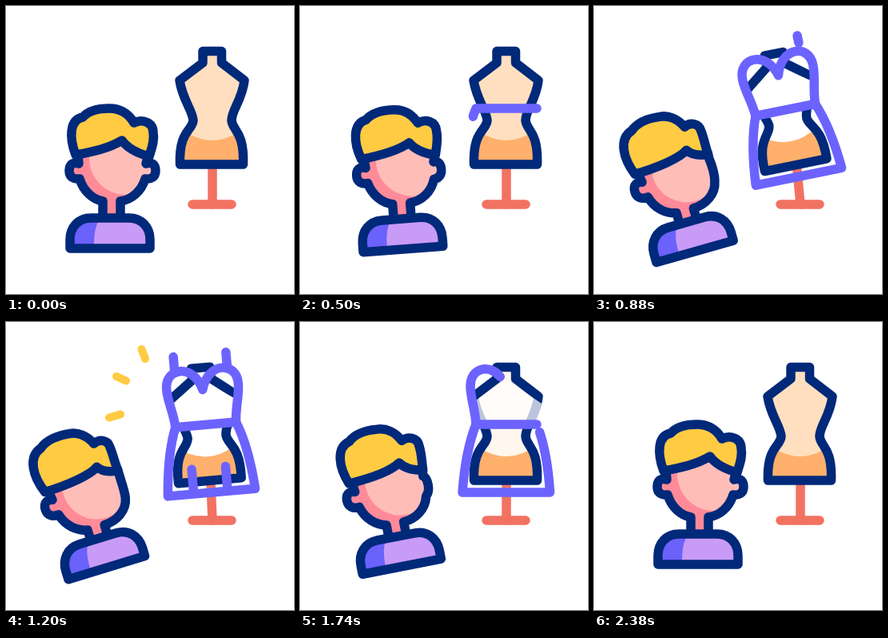
An HTML page for the animation above (2400 ms loop, 360 by 360 pixels).

```html
<!DOCTYPE html>
<html lang="en">
<head>
<meta charset="utf-8">
<title>Tailor</title>
<style>
  html, body { margin: 0; width: 100%; height: 100%; overflow: hidden; background: #fff; }
  svg { display: block; width: 100%; height: 100%; }
  .ink, .thread, .spark, .pole { fill: none; stroke-width: 11.5; stroke-linecap: round; stroke-linejoin: round; }
  .ink { stroke: #00297a; }
  .thread { stroke: #6c63ff; }
  .spark { stroke: #ffcb43; stroke-width: 10; }
  .pole { stroke: #f27262; }
</style>
</head>
<body>
<svg viewBox="0 0 360 360">
  <defs>
    <path id="form" d="M246 56.500H269.500V71L298 93C295 118 282 130 282 143C283 156 298 156 296.500 198H217.500C216 156 233 156 234 143C233 130 221 118 217 93L246 71Z"/>
    <path id="body" d="M80 303V292C80 277 90 265 106 265H154C170 265 180 277 180 292V303Z"/>
    <path id="face"/>
    <clipPath id="inForm"><use href="#form"/></clipPath>
    <clipPath id="inBody"><use href="#body"/></clipPath>
    <clipPath id="inFace"><use href="#face"/></clipPath>
  </defs>

  <path class="pole" d="M233 248H282"/>
  <path class="pole" id="pole"/>

  <g id="stand">
    <use href="#form" id="skin"/>
    <path clip-path="url(#inForm)" fill="#ffb06c" d="M215 150Q258 186 301 150V198H215Z"/>
    <use href="#form" class="ink"/>
    <path id="cover" fill="#fff" d="M214 102L258 72L302 102L296 128H220Z"/>
    <g id="dress"></g>
  </g>

  <g id="person">
    <use href="#face" fill="#ff8a98"/>
    <circle id="glow" clip-path="url(#inFace)" fill="#ffbdb8"/>
    <use href="#face" class="ink"/>
    <path id="hair" class="ink" style="fill:#ffcb43"/>
    <use href="#body" fill="#c89bf6"/>
    <path clip-path="url(#inBody)" fill="#6b61fb" d="M75 260H122C111 272 110 284 110 303H75Z"/>
    <use href="#body" class="ink"/>
  </g>

  <g id="sparks"></g>
</svg>
<script>
const LOOP = 2400;
const $ = id => document.getElementById(id);

const mix = (a, b, k) => a + (b - a) * k;
const smooth = (t, a, b) => {
  const u = Math.min(1, Math.max(0, (t - a) / (b - a)));
  return u * u * (3 - 2 * u);
};
const pulse = (t, [a, b, c, d]) => smooth(t, a, b) - smooth(t, c, d);

// Blend two path strings that share the same commands.
const morph = ([from, to], k) => {
  const goal = to.match(/\d+/g);
  let i = 0;
  return from.replace(/\d+/g, n => mix(+n, +goal[i++], k).toFixed(2));
};

// Front view and turned view.
const FACE = [
  'M90 186L91 197C82 194 79 200 79 206C79 214 85 217 92 216C97 232 109 242 121 244L121 268L143 268L143 244C157 242 169 232 174 216C181 217 187 214 187 206C187 200 184 194 175 197L178 186L145 168Z',
  'M88 190L90 202C81 199 78 205 78 211C78 219 84 223 92 222C96 238 108 248 121 251L121 268L143 268L143 251C159 251 175 242 178 226C179 221 179 216 179 211C179 205 179 201 179 197L179 189L155 179Z'
];
const HAIR = [
  'M87 186C79 165 79 142 96 139C104 130 116 128 129 128C142 128 153 134 160 146C170 141 184 145 184 158C186 168 182 178 179 188C164 184 152 178 145 168C128 178 110 182 87 186Z',
  'M84 190C75 167 76 142 95 136C105 128 121 127 134 129C145 130 155 138 160 150C168 146 178 150 178 160C179 170 178 180 179 191C170 190 160 187 155 179C145 186 115 190 84 190Z'
];

// Each line: path, then draw start, draw end, erase start, erase end.
const DRESS = [
  ['M296 128H220Q207 160 203 213H312.500Q309 160 296 128', 360, 800, 1700, 2100],
  ['M220 128C219 108 213 96 213 80C213 52 249 50 258 84C267 50 303 52 303 80C303 96 297 108 296 128', 560, 860, 1620, 1840],
  ['M291 40V60', 820, 950, 1560, 1680],
  ['M225 40V60', 910, 1040, 1540, 1660],
  ['M235.500 212V182', 1060, 1180, 1280, 1420],
  ['M278 212V182', 1060, 1180, 1280, 1420]
];
const SPARKS = ['M174 46L169.500 34', 'M150 73.500L138 68', 'M143 115.500L129 119.500'];

const addLine = (parent, cls, d) => {
  const path = document.createElementNS('http://www.w3.org/2000/svg', 'path');
  path.setAttribute('class', cls);
  path.setAttribute('d', d);
  parent.append(path);
  return { path, length: path.getTotalLength() };
};
const threads = DRESS.map(([d, ...times]) => ({ ...addLine($('dress'), 'thread', d), times }));
const sparks = SPARKS.map(d => addLine($('sparks'), 'spark', d));

const trim = ({ path, length }, from, to) => {
  path.style.visibility = to - from > 0.005 ? 'visible' : 'hidden';
  path.style.strokeDasharray = `0 ${from * length} ${(to - from) * length} ${length * 2}`;
};

const TILT = [[620, 0], [880, -11.5], [1080, -11.5], [1400, 8.6], [1720, 0]];
const tiltAt = t => TILT.slice(1).reduce(
  (angle, [time, value], i) => angle + (value - TILT[i][1]) * smooth(t, TILT[i][0], time), 0);

function draw(t) {
  const near = Math.min(t, LOOP - t);
  const lean = 0.9 * smooth(near, 320, 840) + 0.1 * smooth(near, 700, 1200);
  $('person').setAttribute('transform', `translate(${-3 * lean} ${4 * lean}) rotate(${-17 * lean} 130 307)`);
  $('face').setAttribute('d', morph(FACE, lean));
  $('hair').setAttribute('d', morph(HAIR, lean));
  $('glow').setAttribute('cx', mix(150, 148, lean));
  $('glow').setAttribute('cy', mix(190, 200, lean));
  $('glow').setAttribute('r', mix(46, 43, lean));

  const tilt = tiltAt(t);
  const sway = 24 * Math.sin(tilt * Math.PI / 180);
  $('stand').setAttribute('transform', `rotate(${tilt} 258 222)`);
  $('pole').setAttribute('d', `M258 248L${258 + sway} 198`);

  const worn = pulse(t, [600, 720, 1700, 1820]);
  $('skin').setAttribute('fill', `rgb(255 ${mix(223, 255, worn)} ${mix(191, 255, worn)})`);
  $('cover').setAttribute('opacity', worn);
  threads.forEach(line => trim(line, 0, pulse(t, line.times)));
  sparks.forEach(line => trim(line, smooth(t, 1220, 1340), smooth(t, 1070, 1190)));
}

function frame() {
  draw(performance.now() % LOOP);
  requestAnimationFrame(frame);
}
frame();
</script>
</body>
</html>
```
